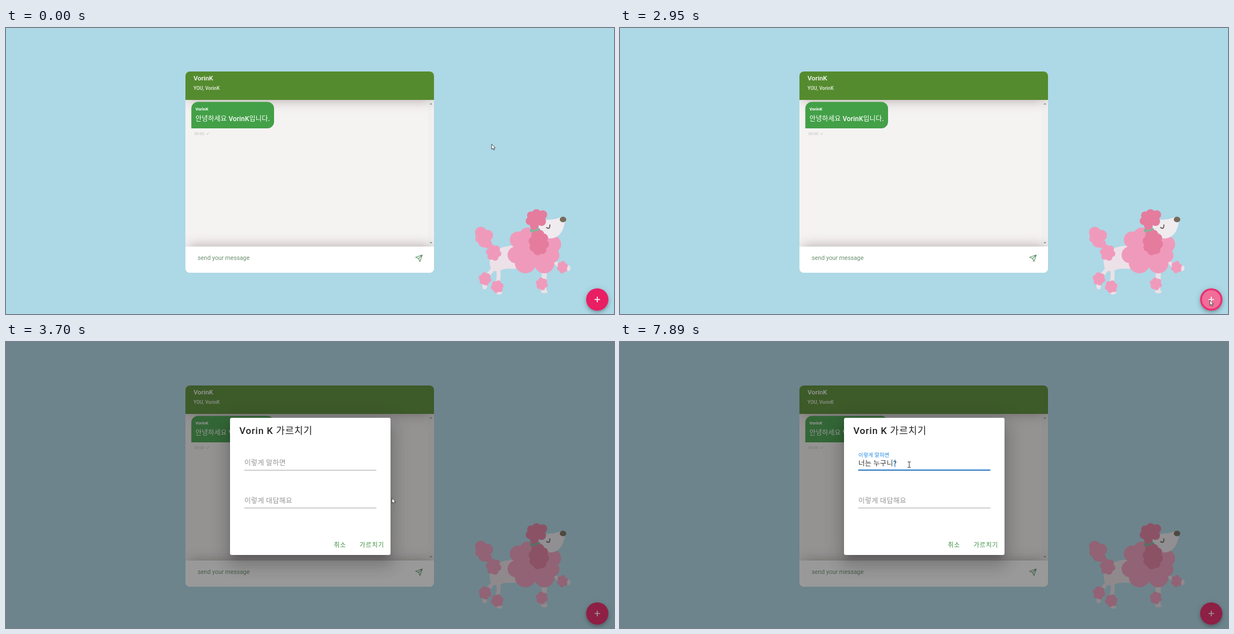
An HTML page for the animation above (8000 ms loop, 1091 px wide and 513 px high).

```html
<!DOCTYPE html>
<html lang="ko">
<head>
<meta charset="utf-8">
<title>Chat</title>
<style>
html, body { margin: 0; width: 100%; height: 100%; overflow: hidden; }
#stage { position: relative; width: 1091px; height: 513px; overflow: hidden; background: #add8e6;
  font-family: Roboto, "Noto Sans CJK KR", "Noto Sans CJK", sans-serif; }
#stage div, svg { position: absolute; }
svg { left: 0; top: 0; overflow: visible; }
text { white-space: pre; }
#card { left: 322px; top: 78px; width: 446px; height: 361px; border-radius: 8px; overflow: hidden; background: #f5f3f2; }
.track { right: 0; top: 51px; width: 11px; height: 263px; background: #f1f0f0; }
.head, .foot { left: 0; width: 446px; }
.head { top: 0; height: 51px; background: #558b2f; box-shadow: 0 6px 22px -6px rgba(60, 35, 40, .38); }
.foot { top: 314px; height: 47px; background: #fff; box-shadow: 0 -6px 22px -6px rgba(60, 35, 40, .38); }
#fab { left: 1041px; top: 467px; width: 40px; height: 40px; border-radius: 50%; overflow: hidden; background: #e91e63; }
.lift { left: 1041px; top: 467px; width: 40px; height: 40px; border-radius: 50%;
  box-shadow: 0 2px 4px -1px rgba(0,0,0,.2), 0 4.5px 7.5px rgba(0,0,0,.14), 0 1px 13px rgba(0,0,0,.12); }
#hover, #ripple { inset: 0; border-radius: 50%; background: #fff; }
#scrim { inset: 0; background: #212121; }
#dialog { left: 401.5px; top: 135.5px; width: 288px; height: 246px; border-radius: 3px; background: #fff;
  box-shadow: 0 8px 11px -5px rgba(0,0,0,.2), 0 18px 28px 2px rgba(0,0,0,.14), 0 7px 35px 6px rgba(0,0,0,.12); }
.field { font-size: 12.5px; letter-spacing: .3px; }
#actions { font-size: 11px; letter-spacing: .95px; }
</style>
</head>
<body>
<div id="stage">
  <div id="card">
    <div class="track"></div>
    <div class="head"></div>
    <div class="foot"></div>
  </div>
  <svg width="1091" height="513">
    <path d="M332.5 180V144.5a12 12 0 0 1 12-12H469a12 12 0 0 1 12 12V168a12 12 0 0 1-12 12Z" fill="#43a047"/>
    <g fill="#fff">
      <text x="336.5" y="94" font-size="11.8" font-weight="500">VorinK</text>
      <text x="336.5" y="111" font-size="8.7" font-weight="500" opacity=".88">YOU, VorinK</text>
      <text x="340" y="148" font-size="7.6" font-weight="700">VorinK</text>
      <text x="340" y="167" font-size="12" font-weight="500" letter-spacing=".2">안녕하세요 VorinK입니다.</text>
    </g>
    <text x="338" y="192" font-size="7.2" fill="#c2c0be">00:00</text>
    <path d="M359.5 189.5l1.5 1.6 3.2-3.4" fill="none" stroke="#c2c0be"/>
    <text x="344" y="416.2" font-size="10.75" fill="#6c8f70">send your message</text>
    <path transform="translate(733.8 405.8) scale(.6)" d="M22 2 11 13M22 2 15 22 11 13 2 9Z"
      fill="none" stroke="#5a9468" stroke-width="1.9" stroke-linejoin="round"/>
    <path d="M760 137.2h5l-2.5-2.8zM760 384h5l-2.5 2.8z" fill="#7d9a7d"/>
    <g id="dog"></g>
  </svg>
  <div class="lift"></div>
  <div id="fab">
    <div id="hover"></div>
    <div id="ripple"></div>
    <svg width="40" height="40"><path d="M20 15v10M15 20h10" stroke="#fff" stroke-width="1.7"/></svg>
  </div>
  <div id="scrim"></div>
  <div id="dialog">
    <svg width="288" height="246" viewBox="401.5 135.5 288 246">
      <text x="418.3" y="164" font-size="17" font-weight="500" letter-spacing=".8" fill="#222">Vorin K 가르치기</text>
      <path id="rule" d="M427 229.5h237" stroke="#949494" stroke-width=".9"/>
      <path d="M427 297.3h237" stroke="#949494" stroke-width=".9"/>
      <path id="focus" d="M427 229.2h237" stroke="#1976d2" stroke-width="1.7"/>
      <text id="label" class="field">이렇게 말하면</text>
      <text x="427.3" y="288.5" class="field" fill="#949494">이렇게 대답해요</text>
      <text id="typed" x="427.3" y="221" class="field" fill="#333"></text>
      <path id="caret" d="M0 210v14" stroke="#1e88e5"/>
      <g id="actions">
        <text x="588" y="367">취소</text>
        <text x="634" y="367">가르치기</text>
      </g>
    </svg>
  </div>
  <svg width="1091" height="513">
    <path id="arrow" d="M.4.4V9.6L2.5 7.7 4 11 5.6 10.3 4.2 7.1H7Z" fill="#fff" stroke="#222" stroke-width=".8"/>
    <path id="beam" d="M-3-5h2q1 0 1 1v8q0 1-1 1h-2M3-5h-2q-1 0-1 1M3 5h-2q-1 0-1-1" fill="none" stroke="#333"/>
  </svg>
</div>
<script>
const $ = id => document.getElementById(id);
const PINK = '#f09abb', ROSE = '#e57c9e', CREAM = '#ece1e7';

const ellipse = (x, y, rx, ry, fill) => `<ellipse cx="${x}" cy="${y}" rx="${rx}" ry="${ry}" fill="${fill}"/>`;
const limb = (d, w) => `<path d="${d}" fill="none" stroke="${CREAM}" stroke-width="${w}" stroke-linecap="round"/>`;
const cluster = (fill, ...lobes) => lobes.map(([x, y, r]) => ellipse(x, y, r, r, fill)).join('');

// Curly tuft: a ring of round lobes about a core.
function tuft(x, y, rx, ry, n, turn, fill) {
  const r = Math.min(rx, ry) * .43;
  let out = ellipse(x, y, rx - r * .6, ry - r * .6, fill);
  for (let i = 0; i < n; i++) {
    const a = turn + i / n * Math.PI * 2;
    out += ellipse(x + Math.cos(a) * (rx - r), y + Math.sin(a) * (ry - r), r, r, fill);
  }
  return out;
}

$('dog').innerHTML = [
  `<path d="M915 390C898 390 882 395 871 402C866 414 867 428 873 436L886 436C894 430 904 432 915 432Z" fill="${CREAM}"/>`,
  limb('M876 429Q868 440 860 450L859 464', 7),
  limb('M883 432Q886 448 881 458L883 472', 7),
  limb('M966 436 965 470', 9),
  limb('M984 419Q996 432 1009 431', 6),
  ellipse(859, 464, 4, 5, CREAM), ellipse(885, 475, 5.5, 3.2, CREAM),
  ellipse(966, 473, 6, 3, CREAM), ellipse(1009, 431, 4, 5, CREAM),
  cluster(PINK, [852, 367, 10.5], [864, 372, 10], [849, 378, 7], [857, 384, 9.5], [864, 387, 8]),
  tuft(875, 403, 14, 15, 6, .2, PINK),
  tuft(859.5, 450, 11.5, 12, 6, .3, PINK),
  tuft(881.5, 464, 11.5, 11.5, 6, .8, PINK),
  tuft(961.5, 459, 11, 11.5, 6, .3, PINK),
  tuft(998.5, 429, 10, 11, 6, .7, PINK),
  cluster(PINK, [919, 380, 15], [936, 373, 15], [915, 407, 15], [932, 421, 19], [966, 422, 18],
    [980, 388, 16], [980, 408, 13], [948, 398, 31]),
  '<path d="M956 346C968 343 983 345 995 339.5L1003 346C1001 361 996 373 982 377C970 379 958 374 956 364Z" fill="#efebef"/>',
  ellipse(999.5, 343.5, 5.8, 5, '#766b5b'),
  '<path d="M969.5 357.5Q976 363 976 352.5" fill="none" stroke="#5d5348" stroke-width="1.7"/>',
  ellipse(945, 363, 5, 4.5, '#86b49e'), ellipse(954, 363, 5, 4.5, '#86b49e'),
  cluster(ROSE, [963, 335, 8], [952, 333, 8], [942, 336, 7], [940, 346, 7.5], [948, 354, 8], [961, 347, 8], [952, 343, 10]),
  tuft(956, 385, 18.5, 23, 8, .2, ROSE)
].join('');

const refresh = [0];
for (const [a, b, n] of [[1130, 1910, 11], [1980, 2480, 7], [2840, 2950, 2], [3030, 3100, 2],
  [3160, 3620, 7], [3700, 4190, 7], [4400, 4720, 5]])
  for (let i = 0; i < n; i++) refresh.push(a + (b - a) * i / (n - 1));

const trail = [[1060, 871, 208], [1910, 1022, 479], [1980, 1027, 484], [2480, 1058, 488],
  [3110, 1058, 488], [3620, 702, 283], [4190, 519, 220]];

// Each entry: time, text with jamo being composed, caret x.
const typing = [[0, '', 427.5], [5640, 'ㄴ', 438.7], [5790, '너', 438.7], [6110, '넌', 438.7],
  [6180, '너느', 450.5], [6330, '너는', 450.5], [6410, '너는 ', 453], [6650, '너는 ㄴ', 464.5],
  [6810, '너는 누', 464.5], [7030, '너는 눅', 464.5], [7110, '너는 누구', 476.5],
  [7190, '너는 누군', 476.5], [7370, '너는 누구니', 487.7], [7890, '너는 누구니?', 493]];

const clamp = v => Math.max(0, Math.min(1, v));
const mix = (a, b, p) => a + (b - a) * p;
const latest = (rows, t) => rows.filter(r => r[0] <= t).pop();

// cubic-bezier(.25, .8, .25, 1)
function swift(x) {
  x = clamp(x);
  let lo = 0, hi = 1;
  const curve = (s, a, b) => 3 * (1 - s) * s * ((1 - s) * a + s * b) + s ** 3;
  for (let i = 0; i < 20; i++) {
    const mid = (lo + hi) / 2;
    if (curve(mid, .25, .25) < x) lo = mid; else hi = mid;
  }
  return curve(lo, .8, 1);
}

function pointer(t) {
  const i = trail.findIndex(k => k[0] > t);
  if (i === 0) return trail[0].slice(1);
  if (i < 0) return trail[trail.length - 1].slice(1);
  const [t0, x0, y0] = trail[i - 1], [t1, x1, y1] = trail[i];
  const p = (t - t0) / (t1 - t0), e = p * p * (3 - 2 * p);
  return [mix(x0, x1, e), mix(y0, y1, e)];
}

function draw(now) {
  const t = refresh.filter(r => r <= now).pop();

  const [x, y] = pointer(t);
  const inField = t > 3620 && x < 664 && y < 232;
  $('arrow').style.display = inField ? 'none' : '';
  $('beam').style.display = inField ? '' : 'none';
  $(inField ? 'beam' : 'arrow').setAttribute('transform', `translate(${x} ${y})`);

  $('hover').style.opacity = x > 1042 ? .07 : 0;
  $('ripple').style.opacity = t < 2840 ? 0 : .3 * (1 - clamp((t - 3100) / 300));
  $('ripple').style.transform = `scale(${mix(.3, 1, clamp((t - 2800) / 195))})`;

  const open = swift((t - 2995) / 337);
  $('scrim').style.opacity = .46 * swift((t - 2960) / 450);
  $('dialog').style.opacity = open;
  $('dialog').style.transform = `scale(${mix(.5, 1, open)})`;
  const tint = clamp((t - 3080) / 220);
  $('actions').setAttribute('fill', `rgb(${mix(80, 56, tint)}, ${mix(80, 142, tint)}, ${mix(80, 60, tint)})`);

  const f = swift((t - 4370) / 300);
  $('rule').setAttribute('stroke', inField ? '#333' : '#949494');
  $('focus').setAttribute('transform', `translate(545.5 0) scale(${f} 1) translate(-545.5 0)`);
  $('focus').style.opacity = f ? 1 : 0;
  $('label').setAttribute('transform', `translate(427.3 ${mix(220.5, 205.5, f)}) scale(${mix(1, .75, f)})`);
  $('label').setAttribute('fill', f ? '#1e88e5' : '#949494');

  const [, text, caretX] = latest(typing, now);
  $('typed').textContent = text;
  $('caret').setAttribute('transform', `translate(${caretX} 0)`);
  $('caret').style.opacity = now >= 5480 || (now >= 4400 && now < 4940) ? 1 : 0;
}

const start = performance.now();
function tick() {
  draw((performance.now() - start) % 8000);
  requestAnimationFrame(tick);
}
tick();
</script>
</body>
</html>
```
